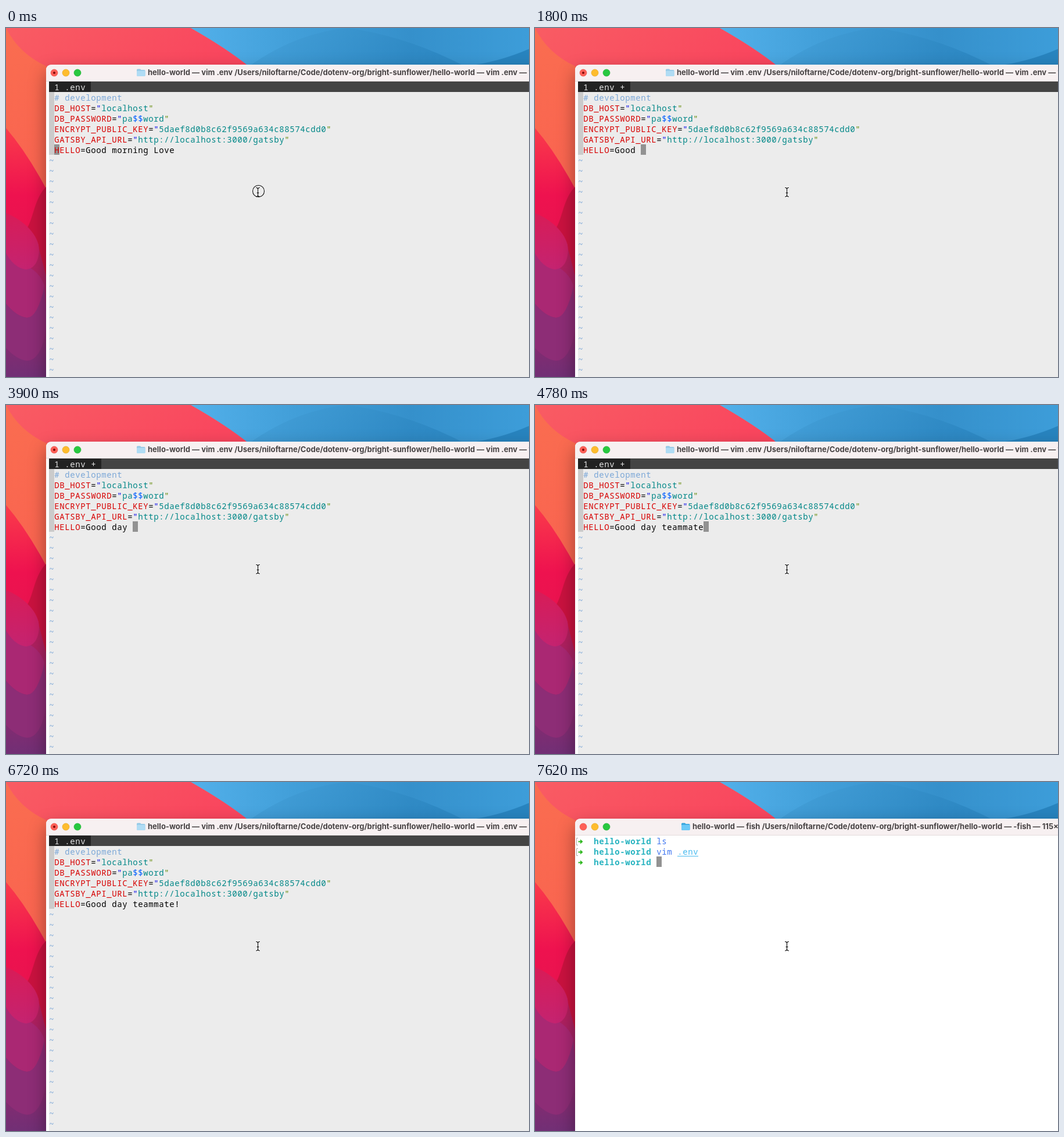
Recreate the animation shown at these times as an HTML page. Size 900 by 600 pixels, loop 8000 ms.

```html
<!DOCTYPE html>
<html lang="en">
<head>
<meta charset="utf-8">
<title>Editing .env</title>
<style>
  html, body { margin: 0; width: 100%; height: 100%; overflow: hidden; }
  svg { display: block; width: 900px; height: 600px; }
  .window { filter: drop-shadow(0 12px 15px rgba(0, 0, 0, .36)); }
  .title { font: 700 13px Inter, sans-serif; fill: #464243; }
  .mono { font: 500 14px "Noto Sans Mono", monospace; letter-spacing: .6px; white-space: pre; }
  .comment, .tilde { fill: #7ba7d7; }
  .key { fill: #d70000; }
  .plain { fill: #000; }
  .open { fill: #0000e8; }
  .str { fill: #008787; }
  .var { fill: #005fff; }
  .close { fill: #5f8700; }
  .hit { fill: #fff; }
  .tab { fill: #e4e4e4; }
  .dir { fill: #2ab4c1; font-weight: 700; }
  .cmd { fill: #3f76f0; }
  .file { fill: #45b9ef; }
  .cursor { fill: #929292; }
  .match { fill: #d70000; }
</style>
</head>
<body>
<svg viewBox="0 0 900 600">
  <defs>
    <linearGradient id="coral" x2=".25" y2="1">
      <stop offset="0" stop-color="#fa6d50"/><stop offset="1" stop-color="#f8584f"/>
    </linearGradient>
    <linearGradient id="pink" x2="1" y2=".2">
      <stop offset="0" stop-color="#f95c63"/><stop offset="1" stop-color="#f9465e"/>
    </linearGradient>
    <linearGradient id="sky">
      <stop offset="0" stop-color="#52b0ea"/><stop offset=".3" stop-color="#429fd9"/>
      <stop offset=".65" stop-color="#3590cb"/><stop offset="1" stop-color="#3d9dd9"/>
    </linearGradient>
    <linearGradient id="deep" x2="1" y2=".3">
      <stop offset="0" stop-color="#459fd7"/><stop offset="1" stop-color="#2680bb"/>
    </linearGradient>
    <linearGradient id="red" x2="0" y2="1">
      <stop offset="0" stop-color="#fa3b4b"/><stop offset=".4" stop-color="#ee124f"/><stop offset="1" stop-color="#e0144f"/>
    </linearGradient>
    <linearGradient id="lobe" x2="0" y2="1">
      <stop offset="0" stop-color="#d81c57"/><stop offset="1" stop-color="#c42370"/>
    </linearGradient>
    <linearGradient id="plum" x2="0" y2="1">
      <stop offset="0" stop-color="#bd1c58"/><stop offset=".5" stop-color="#99276b"/><stop offset="1" stop-color="#712f75"/>
    </linearGradient>
  </defs>

  <g id="wallpaper">
    <rect width="900" height="600" fill="url(#coral)"/>
    <path d="M0 0Q22 44 70 66L416 64Q378 34 318 0Z" fill="url(#pink)"/>
    <path d="M318 0Q378 34 418 66H900V0Z" fill="url(#sky)"/>
    <path d="M418 66Q500 8 588 0Q690 14 790 66Z" fill="url(#deep)" opacity=".55"/>
    <path d="M790 66Q850 58 900 36V66Z" fill="#2884bf"/>
    <path d="M0 172Q36 214 70 278V460H0Z" fill="url(#red)"/>
    <path d="M70 272C49 292 48 325 36 345L56 372Q54 420 70 445Z" fill="#ca123f"/>
    <path d="M0 365Q30 417 57 380L70 430V600H0Z" fill="url(#plum)"/>
    <path d="M0 388C20 405 54 408 66 442C66 475 55 498 36 498Q18 496 0 474Z" fill="#aa2873"/>
    <path d="M0 474Q18 496 36 498Q54 498 66 445L70 500C68 545 55 572 36 572Q18 570 0 550Z" fill="#8d2d76"/>
    <path d="M0 318C30 330 57 356 57 382C56 406 45 415 33 415C20 413 8 402 0 387Z" fill="url(#lobe)"/>
  </g>

  <path class="window" d="M69 640V73Q69 63 79 63H960V640Z" fill="#fff"/>
  <path d="M69 92V73Q69 63 79 63H900V92Z" fill="#f7f0f1"/>
  <path d="M69 91.5H900" stroke="#e3dbdc"/>
  <g stroke-width=".6">
    <circle cx="83" cy="77" r="6" fill="#fe5f57" stroke="#e2463f"/>
    <circle cx="103" cy="77" r="6" fill="#febc2e" stroke="#e1a116"/>
    <circle cx="123" cy="77" r="6" fill="#28c840" stroke="#12ac28"/>
  </g>
  <circle id="dirty" cx="83" cy="77" r="2" fill="#7d0808"/>
  <g id="heading">
    <g id="folder">
      <path d="M-19 72Q-19 70.5-17.5 70.5H-13L-11.5 72H-6Q-4.5 72-4.5 73.5V82H-19Z" fill="#34a3dc"/>
      <rect x="-19" y="73.5" width="14.5" height="9.5" rx="1.2" fill="#6cc9f7"/>
    </g>
    <text id="title" class="title" y="81"></text>
  </g>

  <g id="vim">
    <rect x="74" y="92" width="826" height="508" fill="#ececec"/>
    <rect x="74" y="92" width="826" height="18" fill="#444"/>
    <rect id="tabBox" x="74" y="92" height="18" fill="#222"/>
    <rect x="74" y="110" width="9" height="108" fill="#cbcbcb"/>
    <g id="marks"></g>
    <g id="buffer"></g>
    <g id="live"></g>
  </g>

  <g id="shell">
    <rect class="cursor" x="209" y="128" width="9" height="18"/>
    <path d="M74 96.500H71.500V108.500H74M74 114.500H71.500V126.500H74" fill="none" stroke="#a8a8a8"/>
    <path d="M245 127.500H281" stroke="#45b9ef"/>
  </g>

  <g fill="none" stroke-linecap="round">
    <path id="beamHalo" stroke="#fff" stroke-width="3" d="M430.500 274.500Q433.500 274.500 433.500 277V287.500Q433.500 290 430.500 290M436.500 274.500Q433.500 274.500 433.500 277M433.500 287.500Q433.500 290 436.500 290M432 283.500H435"/>
    <use id="beam" stroke="#000"/>
    <circle id="ring" cx="434.500" cy="280.500" r="10" stroke="#111" stroke-width="1.100"/>
  </g>
</svg>
<script>
const LOOP = 8000, CELL = 9, ROW = 18, LEFT = 83, TOP = 92;
const $ = id => document.getElementById(id);
const escapeText = s => s.replace(/&/g, '&amp;').replace(/</g, '&lt;');

// Parts alternate class name and text.
function line(row, parts, x = LEFT) {
  let spans = '';
  for (let i = 0; i < parts.length; i += 2)
    spans += `<tspan class="${parts[i]}">${escapeText(parts[i + 1])}</tspan>`;
  return `<text class="mono" x="${x + .3}" y="${TOP + 15 + row * ROW}">${spans}</text>`;
}
const cell = (kind, row, col, count = 1) =>
  `<rect class="${kind}" x="${LEFT + col * CELL}" y="${TOP + row * ROW}" width="${count * CELL}" height="${ROW}"/>`;
const setting = (row, key, ...value) =>
  line(row, ['key', key, 'plain', '=', 'open', '"', ...value, 'close', '"']);

$('beam').setAttribute('d', '');
const beam = $('beamHalo').cloneNode();
beam.id = 'beam';
beam.setAttribute('stroke', '#000');
beam.setAttribute('stroke-width', '1.1');
$('beam').replaceWith(beam);
$('beamHalo').setAttribute('opacity', '.7');

$('buffer').innerHTML =
  setting(2, 'DB_HOST', 'str', 'localhost') +
  setting(3, 'DB_PASSWORD', 'str', 'pa', 'var', '$$', 'str', 'word') +
  setting(4, 'ENCRYPT_PUBLIC_KEY', 'str', '5daef8d0b8c62f9569a634c88574cdd0') +
  setting(5, 'GATSBY_API_URL', 'str', 'http://localhost:3000/gatsby') +
  Array.from({ length: 21 }, (_, i) => line(7 + i, ['tilde', '~'], 74)).join('');

const arrow = row => {
  const y = TOP + 10.5 + row * ROW;
  return `<path d="M74.500 ${y - 1}H78V${y - 4}L82.500 ${y}L78 ${y + 4}V${y + 1}H74.500Z" fill="#31b822"/>`;
};
$('shell').insertAdjacentHTML('beforeend',
  ['ls', 'vim ', ''].map((cmd, row) => arrow(row) +
    line(row, ['dir', 'hello-world', 'cmd', ' ' + cmd, 'file', row === 1 ? '.env' : ''], 101)).join(''));

// Each step overrides part of the state before it.
const PATH = '/Users/niloftarne/Code/dotenv-org/bright-sunflower/hello-world';
const steps = [
  [0, { value: 'Good morning Love', cursor: 0, found: '', changed: false, ring: true, shell: false,
        app: 'vim .env', running: 'vim .env', x: 244, busy: true }],
  [150, { ring: false }],
  [450, { cursor: -1 }],
  [600, { found: 'm' }],
  [750, { found: 'mor' }],
  [1050, { cursor: 11 }],
  [1650, { value: 'Good ', cursor: 10, found: '', changed: true }],
  [1800, { cursor: 11 }],
  ...[[1950, 'd'], [2100, 'da'], [2400, 'day'], [3900, 'day '], [4050, 'day te'], [4200, 'day tea'],
    [4340, 'day team'], [4490, 'day teamm'], [4630, 'day teamma'], [4780, 'day teammate'], [5230, 'day teammate!']]
    .map(([at, typed]) => [at, { value: 'Good ' + typed, cursor: 11 + typed.length }]),
  [5980, { cursor: 23 }],
  [6270, { cursor: -1 }],
  [6570, { cursor: 23, changed: false }],
  [6720, { cursor: -1 }],
  [7470, { shell: true, app: 'fish', x: 259 }],
  [7620, { running: '-fish', x: 271, busy: false }]
];

function highlighted(text, found, kind) {
  const at = found ? text.indexOf(found) : -1;
  return at < 0 ? [kind, text]
    : [kind, text.slice(0, at), 'hit', found, kind, text.slice(at + found.length)];
}

function draw(s) {
  const show = (id, on) => $(id).setAttribute('display', on ? 'inline' : 'none');
  show('vim', !s.shell);
  show('shell', s.shell);
  show('ring', s.ring);
  show('dirty', s.busy);
  $('folder').setAttribute('opacity', s.busy ? .5 : 1);
  $('heading').setAttribute('transform', `translate(${s.x})`);
  $('title').textContent = `hello-world — ${s.app} ${PATH} — ${s.running} — 115×36`;
  $('tabBox').setAttribute('width', s.changed ? 90 : 72);

  const comment = '# development', hello = 'HELLO=' + s.value;
  let marks = '';
  [[1, comment], [6, hello]].forEach(([row, text]) => {
    const at = s.found ? text.indexOf(s.found) : -1;
    if (at >= 0) marks += cell('match', row, at, s.found.length);
  });
  if (s.cursor >= 0) marks += cell('cursor', 6, s.cursor);
  $('marks').innerHTML = marks;
  $('live').innerHTML =
    line(0, ['tab', '1 .env' + (s.changed ? ' +' : '')]) +
    line(1, highlighted(comment, s.found, 'comment')) +
    line(6, ['key', 'HELLO', 'plain', '=', ...highlighted(s.value, s.found, 'plain')]);
}

const start = performance.now();
let shown = -1;
function tick() {
  const t = (performance.now() - start) % LOOP;
  const count = steps.filter(([at]) => at <= t).length;
  if (count !== shown) {
    shown = count;
    draw(Object.assign({}, ...steps.slice(0, count).map(([, change]) => change)));
  }
  requestAnimationFrame(tick);
}
tick();
</script>
</body>
</html>
```
